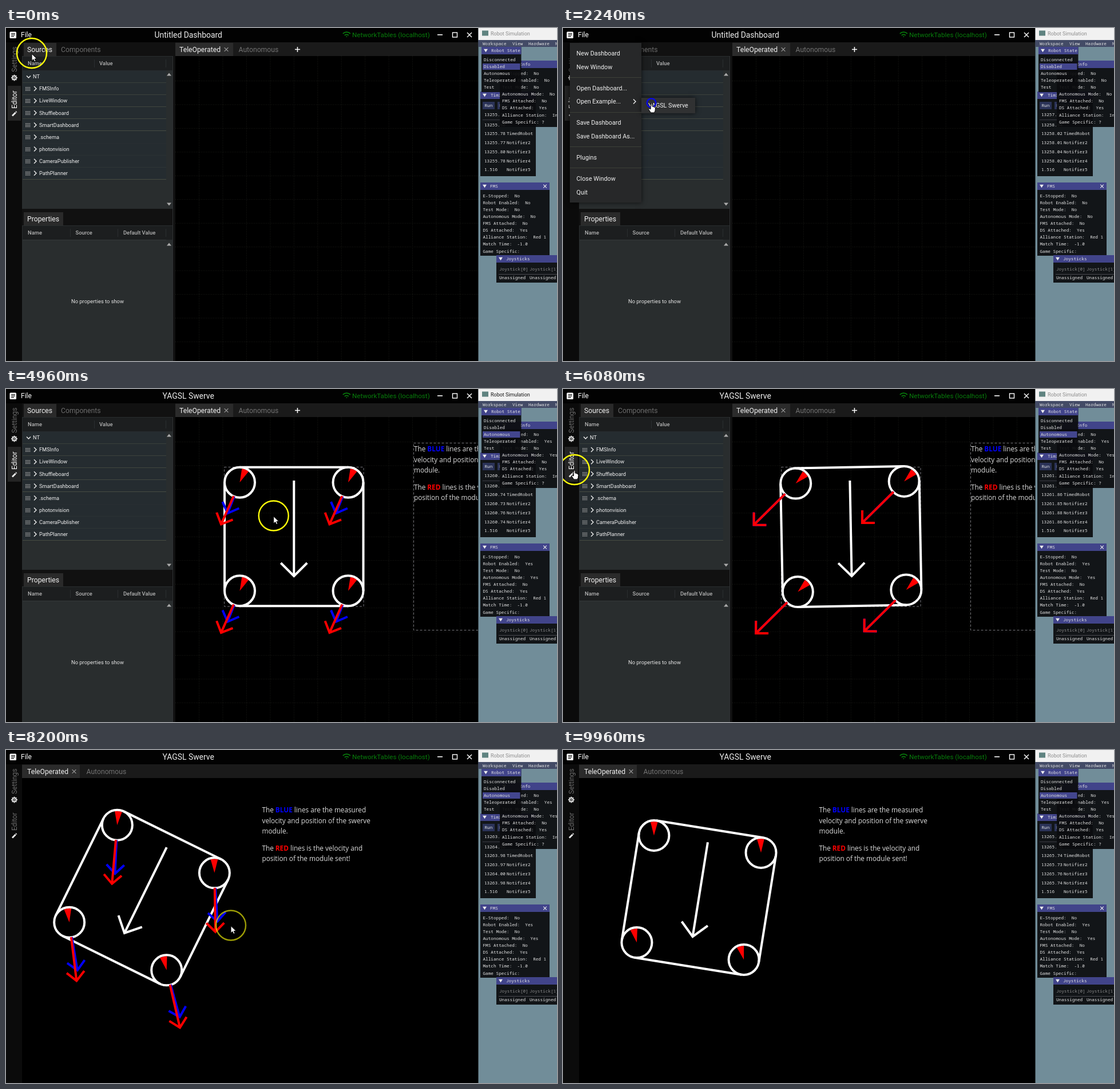
An HTML page with a canvas for the animation above (10000 ms loop, 963 by 582 pixels).

```html
<!DOCTYPE html>
<html lang="en">
<head>
<meta charset="utf-8">
<title>Swerve dashboard</title>
<style>
html, body { margin: 0; width: 100%; height: 100%; overflow: hidden; background: #000; }
canvas { display: block; }
</style>
</head>
<body>
<canvas id="stage" width="963" height="582"></canvas>
<script>
const ctx = document.getElementById('stage').getContext('2d');
const LOOP = 10000, STEP = 40, RAD = Math.PI / 180;
const UI = 'Roboto, sans-serif', PROSE = '"Open Sans", sans-serif', MONO = '"Noto Sans Mono", monospace';
const WHITE = '#fff', RED = '#f00', BLUE = '#00f';

const MENU_OPEN = 960, SUBMENU_OPEN = 1600, LOADED = 2320, ENABLED = 4240, RUN_MODE = 6200;
const CLICKS = [800, 2100, 4160, 5320, 6110];
const CLICK_LENGTH = 200;

// time, x, y
const POINTER = [
  [0, 45, 44], [160, 45, 44], [560, 32, 14], [1040, 32, 14], [1560, 62, 129], [1720, 70, 130],
  [2080, 154.5, 131], [2320, 154.5, 131], [3240, 477.7, 120], [3440, 478, 120], [4000, 879, 72],
  [4160, 864, 79], [4320, 864, 79], [4880, 467.7, 221.5], [5400, 467.7, 221.5], [5960, 20, 141],
  [6280, 20, 141], [7160, 393, 306.5]
];
// time, heading
const HEADING = [
  [4240, 8.5], [4280, 0], [5300, 0], [6080, -1.1], [6400, 3], [6800, 22], [7150, 41],
  [7450, 47], [7750, 43], [8200, 26.2], [8360, 21], [8800, 11.5], [9200, 9.1]
];
// time, wheel direction, difference between front and rear wheels
const WHEELS = [
  [4240, 7, 9], [4280, -20, 0], [4960, -24, 0], [6080, -45.3, 0], [6500, -40, -8],
  [7000, -22, -10], [7450, -8, 0], [8200, 4, 9], [9000, 7, 9]
];
// time, commanded speed, measured speed
const SPEED = [
  [4280, 0, 0], [4960, 54, 32], [5260, 77, 56], [5600, 77, 77], [7700, 77, 77],
  [8200, 77, 59], [8440, 72, 52], [9240, 0, 0]
];

function track(keys, t, smooth) {
  if (t <= keys[0][0]) return keys[0].slice(1);
  for (let i = 1; i < keys.length; i++) {
    const a = keys[i - 1], b = keys[i];
    if (t > b[0]) continue;
    let p = (t - a[0]) / (b[0] - a[0]);
    if (smooth) p = p * p * (3 - 2 * p);
    return a.slice(1).map((v, k) => v + (b[k + 1] - v) * p);
  }
  return keys[keys.length - 1].slice(1);
}

function rect(x, y, w, h, color) {
  ctx.fillStyle = color;
  ctx.fillRect(x, y, w, h);
}

function text(str, x, y, size, color, { font = UI, weight = 400, align = 'left' } = {}) {
  ctx.font = `${weight} ${size}px ${font}`;
  ctx.textAlign = align;
  ctx.fillStyle = color;
  ctx.fillText(str, x, y + size * 0.355);
  return ctx.measureText(str).width;
}

const mono = (str, x, y, color = '#e4e4e4') => text(str, x, y, 7.7, color, { font: MONO });

function line(points, color, width = 1) {
  ctx.beginPath();
  points.forEach(([x, y]) => ctx.lineTo(x, y));
  ctx.strokeStyle = color;
  ctx.lineWidth = width;
  ctx.stroke();
}

function shape(points, color) {
  ctx.beginPath();
  points.forEach(([x, y]) => ctx.lineTo(x, y));
  ctx.closePath();
  ctx.fillStyle = color;
  ctx.fill();
}

function ring(x, y, r, color, width) {
  ctx.beginPath();
  ctx.arc(x, y, r, 0, Math.PI * 2);
  ctx.strokeStyle = color;
  ctx.lineWidth = width;
  ctx.stroke();
}

function cross(x, y, r, color, width = 1) {
  line([[x - r, y - r], [x + r, y + r]], color, width);
  line([[x + r, y - r], [x - r, y + r]], color, width);
}

const triangle = (x, y, rx, ry, color) => shape([[x - rx, y - ry], [x + rx, y - ry], [x, y + ry]], color);
const chevron = (x, y) => line([[x - 2, y - 4], [x + 2, y], [x - 2, y + 4]], '#eee', 1.4);

function at(x, y, angle, draw) {
  ctx.save();
  ctx.translate(x, y);
  ctx.rotate(angle);
  draw();
  ctx.restore();
}

function dashed(x, y, w, h) {
  ctx.setLineDash([4, 3]);
  ctx.strokeStyle = '#77777c';
  ctx.lineWidth = 1;
  ctx.strokeRect(x, y, w, h);
  ctx.setLineDash([]);
}

function titleBar(t) {
  rect(0, 0, 826, 25, '#020202');
  ctx.beginPath();
  ctx.roundRect(6.5, 6.5, 11.5, 11.5, 1.5);
  ctx.fillStyle = WHITE;
  ctx.fill();
  for (const [y, w] of [[9, 7], [11.5, 7], [14, 5]]) rect(9, y, w, 1.2, '#111');
  text('File', 26, 12, 12, WHITE);
  text(t < LOADED ? 'Untitled Dashboard' : 'YAGSL Swerve', 318.7, 11.6, 13.9, '#eee', { align: 'center' });
  const green = '#087d0c';
  for (const r of [1.2, 5, 9.2]) {
    ctx.beginPath();
    ctx.arc(595.3, 16.3, r, -Math.PI * 0.75, -Math.PI * 0.25);
    ctx.strokeStyle = green;
    ctx.lineWidth = 1.8;
    ctx.stroke();
  }
  text('NetworkTables (localhost)', 605, 12, 11.6, green);
  rect(754, 11, 9, 1.6, WHITE);
  ctx.strokeStyle = WHITE;
  ctx.lineWidth = 1.4;
  ctx.strokeRect(780.5, 8, 8, 8);
  cross(810, 12, 4, WHITE, 1.5);
}

function sideTabs(editing) {
  rect(0, 25, 28, 557, '#0b0b0b');
  if (editing) rect(3, 101, 23, 61, '#242424');
  const up = -Math.PI / 2, dim = '#6c6c6c', live = editing ? WHITE : dim;
  at(15, 77, up, () => text('Settings', 0, 0, 12.2, dim));
  at(15, 141, up, () => text('Editor', 0, 0, 12.2, live));
  ring(14.5, 87, 3.3, '#ddd', 2);
  for (let i = 0; i < 8; i++) at(14.5, 87, i * Math.PI / 4, () => rect(-1, -5.4, 2, 2, '#ddd'));
  ring(14.5, 87, 1, '#ddd', 1);
  line([[11, 153.5], [16.8, 147.7]], '#eee', 2.8);
  line([[17.4, 147.1], [18.4, 146.1]], '#eee', 2.8);
}

function panelHeader(y, columns, dividers) {
  rect(29, y, 262, 24, '#1c1e1f');
  for (const x of dividers) rect(x, y + 5, 1, 14, '#2b2e30');
  for (const [name, x] of columns) text(name, x, y + 12, 9.4, '#b4b4b4', { weight: 500 });
}

function editorPanels() {
  rect(28, 25, 268, 557, '#111');
  rect(31, 26, 57, 24, '#2a2a2a');
  text('Sources', 37, 37.5, 12.2, '#f2f2f2');
  text('Components', 96, 37.5, 12.2, '#6c6c6c');
  rect(28, 49, 264, 267, '#292d2e');
  panelHeader(50, [['Name', 38], ['Value', 163]], [154, 279]);
  const names = ['NT', 'FMSInfo', 'LiveWindow', 'Shuffleboard', 'SmartDashboard', '.schema',
    'photonvision', 'CameraPublisher', 'PathPlanner'];
  names.forEach((name, i) => {
    const y = 85 + i * 21.1;
    rect(29, y - 10.5, 251, 21, '#252c30');
    rect(29, Math.round(y + 10), 251, 1, '#474c42');
    text(name, i ? 58 : 47, y, 9.2, '#f0f0f0');
    if (!i) return line([[36, 83.5], [39.5, 87], [43, 83.5]], '#eee', 1.4);
    for (let k = 0; k < 12; k++) rect(34 + (k % 4) * 2.3, y - 3 + Math.floor(k / 4) * 2.6, 1.3, 1.6, '#aaa');
    chevron(51, y);
  });
  triangle(285, 81, 4, -2.5, '#aaa');
  triangle(285, 308, 4, 2.5, '#aaa');

  rect(31, 322, 69, 24, '#2a2a2a');
  text('Properties', 37, 334, 12.2, '#f2f2f2');
  rect(28, 345, 264, 237, '#292d2e');
  panelHeader(346, [['Name', 38], ['Source', 121.5], ['Default Value', 205]], [112, 195, 279]);
  rect(29, 370, 251, 1, '#35393a');
  text('No properties to show', 160, 478, 9.35, '#e4e4e4', { align: 'center' });
  triangle(285, 378, 4, -2.5, '#aaa');
  rect(291, 49, 1, 533, '#303234');
}

function tabs(left, editing) {
  rect(left, 25, 825 - left, 24, '#1a1a1a');
  rect(left, 26, 101, 23, '#2b2b2b');
  const x = editing ? 303 : 37;
  text('TeleOperated', x, 37.5, 12.2, '#f0f0f0');
  cross(x + 82, 37.5, 3.4, '#999', 1.2);
  text('Autonomous', x + 103.5, 37.5, 12.2, '#727272');
  if (editing) {
    rect(505, 36.7, 9, 1.5, WHITE);
    rect(508.7, 33, 1.5, 9, WHITE);
  }
}

function grid() {
  ctx.setLineDash([1, 2]);
  for (let x = 337.5; x < 825; x += 41.45) line([[x, 49], [x, 582]], '#1c1d18');
  for (let y = 92.5; y < 582; y += 41.45) line([[296, y], [825, y]], '#1c1d18');
  ctx.setLineDash([]);
}

function prose(x) {
  const rows = [
    [105, 'The ', 'BLUE', ' lines are the measured', BLUE],
    [123.5, 'velocity and position of the swerve'],
    [141.5, 'module.'],
    [171.5, 'The ', 'RED', ' lines is the velocity and', RED],
    [189.5, 'position of the module sent!']
  ];
  for (const [y, start, word, rest, color] of rows) {
    const style = { font: PROSE };
    let pen = x + text(start, x, y, 11.75, '#ddd', style);
    if (!word) continue;
    pen += text(word, pen, y, 11.75, color, { font: PROSE, weight: 700 });
    text(rest, pen, y, 11.75, '#ddd', style);
  }
}

// Angles run from straight down towards the right.
function arrow(x, y, angle, length, color) {
  if (length < 1) return;
  at(x, y, -angle * RAD, () => {
    const tip = 26 + length, arm = Math.min(15.5, length * 0.5);
    line([[0, 26], [0, tip]], color, 4);
    line([[-arm, tip - arm], [0, tip], [arm, tip - arm]], color, 4);
  });
}

function robot(cx, cy, t) {
  const [heading] = track(HEADING, t), [dir, spread] = track(WHEELS, t), [sent, measured] = track(SPEED, t);
  const half = 94.75, edge = half + 26.5, c = Math.cos(heading * RAD), s = Math.sin(heading * RAD);
  at(cx, cy, heading * RAD, () => {
    for (let i = 0; i < 4; i++) at(0, 0, i * Math.PI / 2, () => line([[-half, -edge], [half, -edge]], WHITE, 4));
    line([[0, -98], [0, 69]], WHITE, 4);
    line([[-23, 46], [0, 69], [23, 46]], WHITE, 4);
  });
  const wheels = [[-1, -1], [1, -1], [-1, 1], [1, 1]].map(([sx, sy]) => {
    const x = half * (sx * c - sy * s), y = half * (sx * s + sy * c);
    return [cx + x, cy + y, dir + spread * y / 126];
  });
  for (const [x, y, angle] of wheels) {
    const back = -Math.PI / 2 - angle * RAD;
    ctx.beginPath();
    ctx.moveTo(x, y);
    ctx.arc(x, y, 24.5, back - 15 * RAD, back + 15 * RAD);
    ctx.fillStyle = RED;
    ctx.fill();
    ring(x, y, 26.5, WHITE, 4);
  }
  const lag = 2.5 * Math.min(1, (sent - measured) / 10);
  for (const [x, y, angle] of wheels) arrow(x, y, angle + lag, measured, BLUE);
  for (const [x, y, angle] of wheels) arrow(x, y, angle, sent, RED);
}

function workspace(t, editing) {
  const left = editing ? 296 : 28;
  ctx.save();
  ctx.beginPath();
  ctx.rect(left, 25, 825 - left, 557);
  ctx.clip();
  rect(left, 25, 825 - left, 557, '#000');
  tabs(left, editing);
  if (editing) grid();
  if (t >= LOADED) {
    if (editing) {
      dashed(381.5, 136.5, 243.5, 243.5);
      dashed(712.5, 94.5, 243, 327);
    }
    prose(editing ? 713 : 447.5);
    robot(editing ? 503.25 : 237.5, 258, t);
  }
  ctx.restore();
}

function menu(t) {
  ctx.save();
  ctx.shadowColor = 'rgba(0,0,0,.7)';
  ctx.shadowBlur = 8;
  rect(12, 26, 125, 279, '#272829');
  if (t >= SUBMENU_OPEN) rect(137, 122, 94, 27, '#303132');
  ctx.restore();
  const items = [['New Dashboard', 44], ['New Window', 68], ['Open Dashboard...', 105],
    ['Open Example...', 128.5], ['Save Dashboard', 165.5], ['Save Dashboard As...', 189.5],
    ['Plugins', 226.5], ['Close Window', 263.5], ['Quit', 287.5]];
  for (const [label, y] of items) text(label, 23.5, y, 10.8, '#f2f2f2');
  for (const y of [86, 147, 207, 244]) rect(12, y, 125, 1, '#3d4038');
  chevron(125, 128.5);
  if (t >= SUBMENU_OPEN) text('YAGSL Swerve', 149, 135, 10.75, '#f2f2f2');
}

function simWindow(x, y, w, h, title, titleX) {
  rect(x, y, w, h, 'rgba(11,12,14,.93)');
  rect(x, y, w, 13, '#41448a');
  triangle(x + 7.5, y + 6.5, 3.5, 2.8, '#eee');
  mono(title, titleX, y + 6.5);
}

function timing(t) {
  simWindow(829, 111, 97, 148, 'Timing', 847);
  rect(833, 129, 21, 13, '#2b3358');
  mono('Run', 836.5, 135.5);
  rect(859, 129, 30, 13, '#2b3358');
  mono('Pause', 862, 135.5);
  const names = ['', '', 'TimedRobot', 'Notifier2', 'Notifier3', 'Notifier4', 'Notifier5'];
  const rows = [151.5, 169, 184.5, 200.5, 216, 232, 247.5];
  const offsets = [-0.08, 0.02, 0, -0.01, 0.02, 0];
  rect(833, 160, 89, 1, '#3a3b44');
  rows.forEach((y, i) => {
    const value = i < 6 ? (13255.78 + t / 1000 + offsets[i]).toFixed(2) : '1.516';
    mono(value, 836, y);
    mono(names[i], 875, y);
  });
}

function simulator(t) {
  const on = t >= ENABLED ? 'Yes' : 'No';
  const status = ['E-Stopped:  No', `Robot Enabled:  ${on}`, 'Test Mode:  No', `Autonomous Mode:  ${on}`,
    'FMS Attached:  No', 'DS Attached:  Yes'];
  rect(825.5, 0, 138, 582, '#718d99');
  rect(825.5, 0, 138, 21, '#f1f1f1');
  rect(832, 4.5, 11, 9, '#5f8380');
  text('Robot Simulation', 847, 9.5, 9, t >= 4200 && t < 5400 ? '#151515' : '#8d8d8d');
  rect(825.5, 21, 138, 12, '#434b66');
  [['Workspace', 833], ['View', 885], ['Hardware', 913], ['NetworkTables', 960]].forEach(([s, x]) => mono(s, x, 27));

  timing(t);
  simWindow(863, 57, 100, 116, 'Info', 898);
  [...status, 'Alliance Station:  Invalid', 'Game Specific: ?'].forEach((s, i) => mono(s, 867, 79 + i * 12.15));
  simWindow(831, 33, 69.5, 79, 'Robot State', 848);
  rect(833, t >= ENABLED ? 74 : 62, 65.5, 11, '#43468e');
  ['Disconnected', 'Disabled', 'Autonomous', 'Teleoperated', 'Test'].forEach((s, i) => mono(s, 835, 55 + i * 12.1));

  simWindow(829, 270, 121, 128, 'FMS', 846);
  cross(942, 276.5, 2.8, '#eee', 1.1);
  [...status, 'Alliance Station:  Red 1', 'Match Time:  -1.0', 'Game Specific:']
    .forEach((s, i) => mono(s, 833.5, 293 + i * 12.1));
  simWindow(857, 397, 106, 48, 'Joysticks', 874);
  mono('Joystick[0]', 862, 421.5, '#8b8b8b');
  mono('Joystick[1]', 915, 421.5, '#8b8b8b');
  rect(861, 430, 102, 1, '#4a4a50');
  mono('Unassigned', 862, 436);
  mono('Unassigned', 915, 436);
}

function pointer(t) {
  if (t >= 8440) return;
  const [x, y] = track(POINTER, t, true);
  const click = CLICKS.find(start => t >= start && t < start + CLICK_LENGTH);
  if (click !== undefined) {
    ring(x, y, 26 * (1 - (t - click) / CLICK_LENGTH), '#0a0ae0', 2.6);
  } else {
    ctx.globalAlpha = Math.max(0, Math.min(1, (8360 - t) / 260));
    ring(x, y, 26, '#ffff0a', 2.4);
    ctx.globalAlpha = 1;
  }
  const hand = (t >= 500 && t < 2400) || (t >= 5900 && t < 6360);
  ctx.beginPath();
  const outline = hand
    ? [[-1, 0], [1, 0], [1.5, 5], [5, 6], [7, 8], [6.5, 13], [5, 16], [-1, 16], [-5, 10], [-4, 8.5], [-1.5, 10]]
    : [[0, 0], [0, 12.5], [2.9, 9.8], [4.8, 14], [7, 13], [5.2, 9], [9, 8.8]];
  outline.forEach(([dx, dy]) => ctx.lineTo(x + dx, y + dy + 1));
  ctx.closePath();
  ctx.fillStyle = WHITE;
  ctx.strokeStyle = '#000';
  ctx.lineWidth = 1;
  ctx.fill();
  ctx.stroke();
}

function draw(t) {
  const editing = t < RUN_MODE;
  rect(0, 0, 963, 582, '#000');
  titleBar(t);
  sideTabs(editing);
  if (editing) editorPanels();
  workspace(t, editing);
  if (t >= MENU_OPEN && t < LOADED) menu(t);
  simulator(t);
  pointer(t);
}

const began = performance.now();
function frame() {
  const t = (performance.now() - began) % LOOP;
  draw(Math.floor(t / STEP) * STEP);
  requestAnimationFrame(frame);
}
frame();
</script>
</body>
</html>
```
